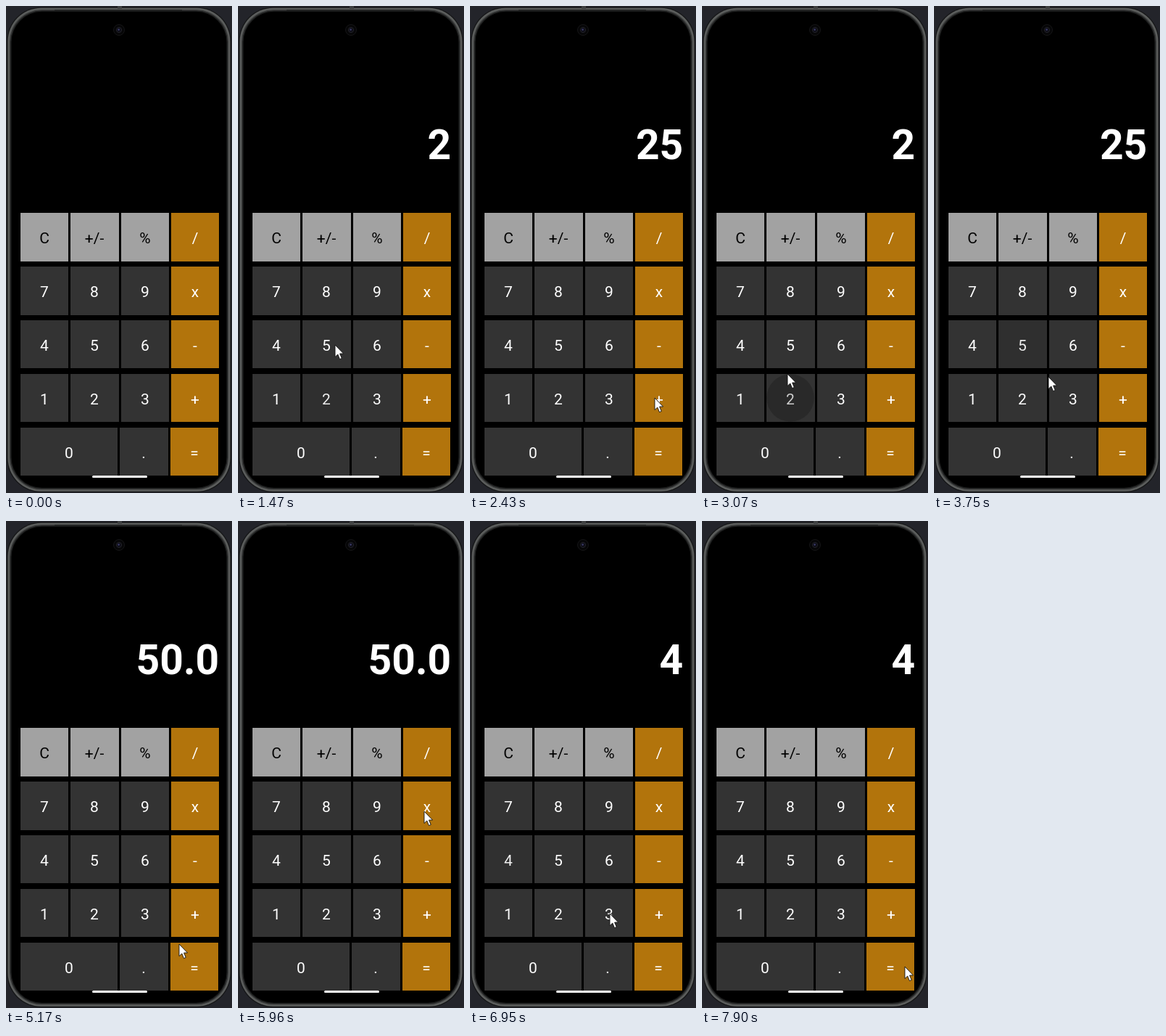
Write an HTML page that moves like this. It is 312 px wide and 671 px high and loops after 8000 ms.

```html
<!DOCTYPE html>
<html lang="en">
<head>
<meta charset="utf-8">
<title>Calculator</title>
<style>
html, body { margin: 0; width: 100%; height: 100%; overflow: hidden; background: #23242a; }
svg { display: block; font-family: Roboto, sans-serif; }
#stage { width: 100vw; height: 100vh; }
</style>
</head>
<body>
<svg id="stage" viewBox="0 0 312 671">
  <rect width="312" height="671" fill="#23242a"/>
  <g id="body"></g>
  <path d="M67 6H243" stroke="#222323" stroke-width="2"/>
  <rect x="154" y="0" width="6" height="4" fill="#3f4142"/>
  <circle cx="156" cy="33" r="7.5" fill="#060607" stroke="#151517"/>
  <circle cx="156" cy="33" r="3.6" fill="#0d0d16" stroke="#222228"/>
  <circle cx="155.6" cy="32.6" r="1.3" fill="#3b3b68"/>
  <text id="display" x="294.3" y="211" text-anchor="end" font-size="57" font-weight="700" fill="#fff"></text>
  <g id="keys"></g>
  <rect x="119" y="647" width="76" height="3" rx="1.5" fill="#fff"/>
  <path id="cursor" d="M0 0V16.5L3.8 13L6.5 19.6L9.3 18.4L6.6 12H11.6Z" fill="#fff" stroke="#111" stroke-width=".9" stroke-linejoin="round"/>
</svg>
<script>
const LOOP = 8000, TICK = 140, PHASE = 70;
const APPEAR = 280, TAP_DELAY = 80, RELEASE = 140;
const NS = "http://www.w3.org/2000/svg";
const $ = id => document.getElementById(id);
const display = $("display"), cursor = $("cursor");

const clamp = v => Math.min(1, Math.max(0, v));
const smooth = v => v * v * (3 - 2 * v);

function add(parent, tag, attrs) {
  const el = document.createElementNS(NS, tag);
  for (const k in attrs) el.setAttribute(k, attrs[k]);
  return parent.appendChild(el);
}

// Phone body: nested rounded rects from the outer rim to the screen
["#161718", "#5f6160", "#565857", "#343535", "#1b1c1c", "#000"].forEach((fill, i) => {
  const inset = 1.3 + i * 1.25;
  add($("body"), "rect", {
    x: inset, y: inset + 0.3, width: 312 - 2 * inset, height: 671 - 2 * inset, rx: 47 - i, fill
  });
});

// Keypad
const rows = [["C", "+/-", "%", "/"], ["7", "8", "9", "x"], ["4", "5", "6", "-"], ["1", "2", "3", "+"], ["0", ".", "="]];
const keys = {};
rows.forEach((row, r) => row.forEach((label, c) => {
  const wide = label === "0";
  const left = 20 + c * 69.4 + (r === 4 && c ? 68 : 0);
  const top = 285 + r * 73.9;
  const x = Math.round(left), y = Math.round(top);
  const width = Math.round(left + (wide ? 134.2 : 66.2)) - x;
  const height = Math.round(top + 66.6) - y;
  const cx = Math.floor(width / 2), cy = height / 2;
  const light = r === 0 && c < 3;
  const fill = c === row.length - 1 ? "#b2740c" : light ? "#a2a2a2" : "#333";
  const key = add($("keys"), "svg", { x, y, width, height });
  add(key, "rect", { width, height, fill });
  add(key, "text", { x: cx, y: 42, "text-anchor": "middle", "font-size": 21, fill: light ? "#000" : "#fff" }).textContent = label;
  keys[label] = { x: x + cx, y: y + cy, ripple: add(key, "circle", { cx, cy, r: 0, fill: "#000" }) };
}));

// Where the pointer travels; tapped stops press their key shortly after arrival
const stop = (key, from, to, tap, dx = 0, dy = 1) =>
  ({ key, from, to, press: tap ? to + TAP_DELAY : Infinity, x: keys[key].x + dx, y: keys[key].y + dy });
const stops = [
  stop("3", 0, APPEAR, false, 10, 22),
  stop("2", APPEAR, 970, true),
  stop("5", 1190, 1470, true, 12),
  stop("+", 1750, 2350, true, -4),
  stop("2", 2570, 2780, true, -3),
  stop("5", 2830, 3210, true, -5),
  stop("=", 3430, 4190, true, -10, -5),
  stop("6", 5000, 5400, false),
  stop("x", 5400, 5950, true, -4, 7),
  stop("4", 6090, 6420, true, -3),
  stop("3", 6650, 6930, false, 1),
  stop("=", 6930, 7350, false, 20, 0)
];

const ops = { "+": (a, b) => a + b, "-": (a, b) => a - b, "x": (a, b) => a * b, "/": (a, b) => a / b };

function reading(t) {
  let shown = "", held = 0, op = null, fresh = true;
  for (const { key, press } of stops) {
    if (press + RELEASE > t) continue;
    if (key === "=") {
      shown = ops[op](held, +shown).toFixed(1);
      fresh = true;
    } else if (ops[key]) {
      held = +shown;
      op = key;
      fresh = true;
    } else {
      shown = fresh ? key : shown + key;
      fresh = false;
    }
  }
  return shown;
}

function pointer(t) {
  let { x, y } = stops[0];
  for (const s of stops) {
    const k = smooth(clamp((t - s.from) / (s.to - s.from)));
    x += (s.x - x) * k;
    y += (s.y - y) * k;
  }
  return [Math.round(x), Math.round(y)];
}

function drawRipple(label, t) {
  const last = stops.filter(s => s.key === label && s.press <= t).pop();
  const age = last ? t - last.press : LOOP;
  const { ripple } = keys[label];
  ripple.setAttribute("r", 47 * clamp(age / 215));
  ripple.setAttribute("opacity", 0.2 * clamp((550 - age) / 350));
}

function render(time) {
  const t = Math.floor((time - PHASE) / TICK) * TICK + PHASE;
  display.textContent = reading(t);
  Object.keys(keys).forEach(label => drawRipple(label, t));
  cursor.setAttribute("visibility", time < APPEAR ? "hidden" : "visible");
  cursor.setAttribute("transform", `translate(${pointer(t)})`);
}

const start = performance.now();
function frame() {
  render((performance.now() - start) % LOOP);
  requestAnimationFrame(frame);
}
frame();
</script>
</body>
</html>
```
